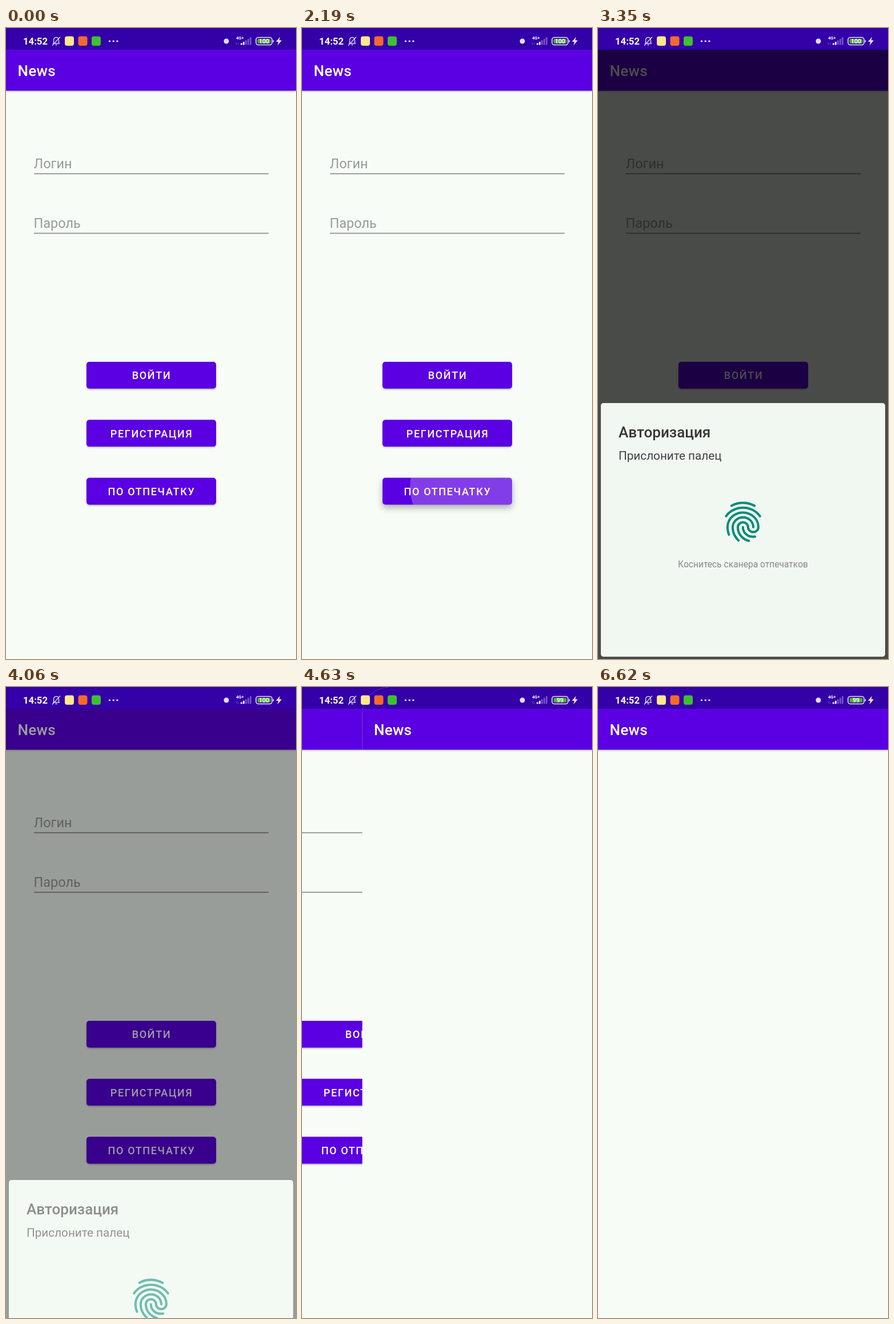
An HTML page with a canvas that plays this animation: 508 by 1102 pixels, repeating every 6.66 s.

```html
<!DOCTYPE html>
<html lang="ru">
<head>
<meta charset="utf-8">
<title>News</title>
<style>
  html, body { margin: 0; width: 100%; height: 100%; overflow: hidden; background: #000; }
  canvas { display: block; width: 100vw; height: 100vh; }
</style>
</head>
<body>
<canvas id="stage" width="508" height="1102"></canvas>
<script>
const W = 508, H = 1102, LOOP = 6660;
const ctx = document.getElementById('stage').getContext('2d');

const PAGE = '#f7fcf7', BAR = '#5a00e2', STATUS = '#3400a8', SHEET = '#f1f7f1';
const TIME = { press: 2093, release: 2330, show: 2703, hide: 3846, battery: 4300, slide: 4416, settled: 5080 };
const DIALOG = { x: 5, y: 655, w: 498, h: 443, travel: 452, dim: 0.7 };
const BUTTONS = [[583, 'ВОЙТИ'], [684.3, 'РЕГИСТРАЦИЯ'], [785.6, 'ПО ОТПЕЧАТКУ']];
const FINGERPRINT = new Path2D(`
  M6.2 3.97C7.9 3 9.9 2.5 12 2.5S15.8 2.95 17.8 3.97
  M3.5 9.2C4.4 7.9 5.6 6.85 7.07 6.1C10.1 4.55 14 4.55 16.9 6.1C18.35 6.85 19.55 7.9 20.5 9.2
  M9.75 21.3C8.9 20.4 8.45 19.9 7.8 18.7C7.2 17.6 6.85 16.1 6.85 14.66C6.85 11.95 9.15 9.75 12 9.75S17.15 11.95 17.15 14.66
  M11.94 14.66C11.94 16.2 12.75 17.7 14.1 18.6C15.2 19.35 16.5 19.55 18.05 19.35
  M14.9 21.5C13.3 21.05 12.4 20.5 11.4 19.5C10.1 18.2 9.4 16.5 9.4 14.66C9.4 13.3 10.55 12.2 11.97 12.2
  S14.55 13.3 14.55 14.66C14.55 16 15.7 17.1 17.13 17.1S19.7 16 19.7 14.66C19.7 10.6 16.2 7.33 11.95 7.33
  C8.9 7.33 6.15 9 4.9 11.65C4.45 12.55 4.25 13.55 4.25 14.66C4.25 15.5 4.35 16.8 4.95 18.4`);
const BELL = new Path2D('M82 27H94M83.5 27V22C83.5 18 85.5 16.5 88 16.5S92.5 18 92.5 22V27M86.5 29.5H89.5M81 30.5L95 15.5');
const BOLT = new Path2D('M480 15.5L473 24H477.3L475.5 30.5L483 21.5H478.5Z');

const clamp = v => Math.max(0, Math.min(1, v));
const lerp = (a, b, p) => a + (b - a) * p;
const progress = (t, start, duration) => clamp((t - start) / duration);

function bezierEase(x1, y1, x2, y2) {
  const at = (a, b, s) => 3 * (1 - s) * (1 - s) * s * a + 3 * (1 - s) * s * s * b + s * s * s;
  return x => {
    let lo = 0, hi = 1;
    for (let i = 0; i < 24; i++) {
      const mid = (lo + hi) / 2;
      if (at(x1, x2, mid) < x) lo = mid; else hi = mid;
    }
    return at(y1, y2, lo);
  };
}
const standard = bezierEase(0.4, 0, 0.2, 1);
const decelerate = bezierEase(0, 0, 0.2, 1);
const accelerate = bezierEase(0.4, 0, 1, 1);

function text(str, x, y, size, color, { weight = 400, align = 'left', spacing = 0 } = {}) {
  ctx.font = `${weight} ${size}px Roboto, sans-serif`;
  ctx.letterSpacing = spacing + 'px';
  ctx.textAlign = align;
  ctx.fillStyle = color;
  ctx.fillText(str, x, y);
}

function roundRect(x, y, w, h, r, color) {
  ctx.beginPath();
  ctx.roundRect(x, y, w, h, r);
  ctx.fillStyle = color;
  ctx.fill();
}

function dot(x, y, r, color) {
  ctx.beginPath();
  ctx.arc(x, y, r, 0, 2 * Math.PI);
  ctx.fillStyle = color;
  ctx.fill();
}

function withShadow(offset, blur, alpha, draw) {
  ctx.save();
  ctx.shadowColor = `rgba(0,0,0,${alpha})`;
  ctx.shadowOffsetY = offset;
  ctx.shadowBlur = blur;
  draw();
  ctx.restore();
}

function drawStatusIcons(battery) {
  text('14:52', 30, 29, 16.7, '#fff', { weight: 600 });
  ctx.strokeStyle = '#dcd6f2';
  ctx.lineWidth = 1.4;
  ctx.stroke(BELL);
  roundRect(103, 14.5, 16, 16.5, 4, '#ffe78c');
  roundRect(126.5, 14.5, 16, 16.5, 4, '#f6682c');
  roundRect(150, 14.5, 16, 16.5, 4, '#3fc12f');
  for (let i = 0; i < 3; i++) dot(181.5 + 6.7 * i, 23, 1.6, '#fff');

  dot(386, 23, 4.5, '#e4def6');
  text('4G+', 403, 20, 7.6, '#fff', { weight: 700 });
  text('↑↓', 402, 29, 6, '#d8d0f0', { weight: 700 });
  for (let i = 0; i < 5; i++) {
    const h = 3 + 2.6 * i;
    roundRect(411 + 4 * i, 29.5 - h, 2.8, h, 0.8, i < 2 ? '#fff' : 'rgba(255,255,255,.32)');
  }

  ctx.beginPath();
  ctx.roundRect(438, 16.5, 28, 13, 4);
  ctx.strokeStyle = '#e8e6f2';
  ctx.lineWidth = 1.6;
  ctx.stroke();
  roundRect(440.5, 19, 23, 8, 2, '#4fae35');
  roundRect(467.5, 21, 1.7, 4, 0.8, '#e8e6f2');
  text(battery, 452, 26.8, 10.5, '#fff', { weight: 700, align: 'center' });
  ctx.fillStyle = '#f0ecfa';
  ctx.fill(BOLT);
}

function drawBasePage() {
  ctx.fillStyle = PAGE;
  ctx.fillRect(0, 0, W, H);
  withShadow(1, 3, 0.22, () => {
    ctx.fillStyle = BAR;
    ctx.fillRect(0, 38, W, 71.6);
  });
  ctx.fillStyle = STATUS;
  ctx.fillRect(0, 0, W, 38);
  text('News', 20.5, 84, 26, '#fff', { weight: 500, spacing: 0.32 });
}

function drawField(label, y) {
  text(label, 48.5, y, 23.5, '#969c97');
  ctx.fillStyle = '#828783';
  ctx.fillRect(49, y + 8.7, 411, 1.6);
}

function drawRipple(t, y) {
  const p = standard(progress(t, TIME.press, 225));
  const alpha = 0.24 * progress(t, TIME.press, 75) * (1 - progress(t, TIME.release, 150));
  if (!alpha) return;
  ctx.save();
  ctx.beginPath();
  ctx.roundRect(141, y, 227, 46.8, 5);
  ctx.clip();
  dot(lerp(337, 254.5, p), lerp(786, 809, p), 118 * (0.3 + 0.7 * p), `rgba(255,255,255,${alpha})`);
  ctx.restore();
}

function drawButton(t, y, label, pressable) {
  const lift = pressable ? progress(t, TIME.press, 100) * (1 - progress(t, TIME.release, 120)) : 0;
  withShadow(lerp(1.5, 6, lift), lerp(3, 12, lift), 0.3, () => roundRect(141, y, 227, 46.8, 5, BAR));
  if (pressable) drawRipple(t, y);
  text(label, 255, y + 30.4, 18.1, '#fff', { weight: 500, align: 'center', spacing: 1.62 });
}

function drawLogin(t) {
  drawBasePage();
  drawField('Логин', 245);
  drawField('Пароль', 349);
  BUTTONS.forEach(([y, label], i) => drawButton(t, y, label, i === 2));
}

function drawDialog(t) {
  const shown = t < TIME.hide
    ? decelerate(progress(t, TIME.show, 250))
    : 1 - accelerate(progress(t, TIME.hide, 350));
  if (shown <= 0) return;
  const { x, w, h } = DIALOG;
  const y = DIALOG.y + DIALOG.travel * (1 - shown);
  ctx.save();

  // The scrim surrounds the sheet, so the two fade as one layer.
  ctx.globalAlpha = DIALOG.dim * shown;
  ctx.beginPath();
  ctx.rect(0, 38, W, H + 600);
  ctx.roundRect(x, y, w, h, 5);
  ctx.fillStyle = '#000';
  ctx.fill('evenodd');

  ctx.globalAlpha = shown;
  roundRect(x, y, w, h, 5, SHEET);
  text('Авторизация', 36, y + 59.5, 26, '#353535', { weight: 500 });
  text('Прислоните палец', 36, y + 98.5, 20.7, '#424242');
  text('Коснитесь сканера отпечатков', 254, y + 287, 15.6, '#898989', { align: 'center' });
  ctx.translate(212, y + 165.5);
  ctx.scale(3.5, 3.5);
  ctx.strokeStyle = '#008c78';
  ctx.lineWidth = 1.15;
  ctx.lineCap = 'round';
  ctx.stroke(FINGERPRINT);
  ctx.restore();
}

function drawCard(x, draw) {
  ctx.save();
  ctx.translate(x, 0);
  ctx.beginPath();
  ctx.roundRect(0, 0, W, H, 48);
  ctx.clip();
  draw();
  ctx.restore();
}

function drawScene(t) {
  ctx.fillStyle = '#000';
  ctx.fillRect(0, 0, W, H);
  if (t < TIME.slide) {
    drawLogin(t);
    drawDialog(t);
  } else if (t < TIME.settled) {
    // Critically damped spring.
    const k = 13.7 * (t - TIME.slide) / 1000;
    const p = 1 - Math.exp(-k) * (1 + k);
    drawCard(-0.36 * W * p, () => drawLogin(t));
    drawCard(W * (1 - p), drawBasePage);
  } else {
    drawBasePage();
  }
  drawStatusIcons(t < TIME.battery ? '100' : '99');
}

const start = performance.now();
function frame() {
  drawScene((performance.now() - start) % LOOP);
  requestAnimationFrame(frame);
}
frame();
</script>
</body>
</html>
```
